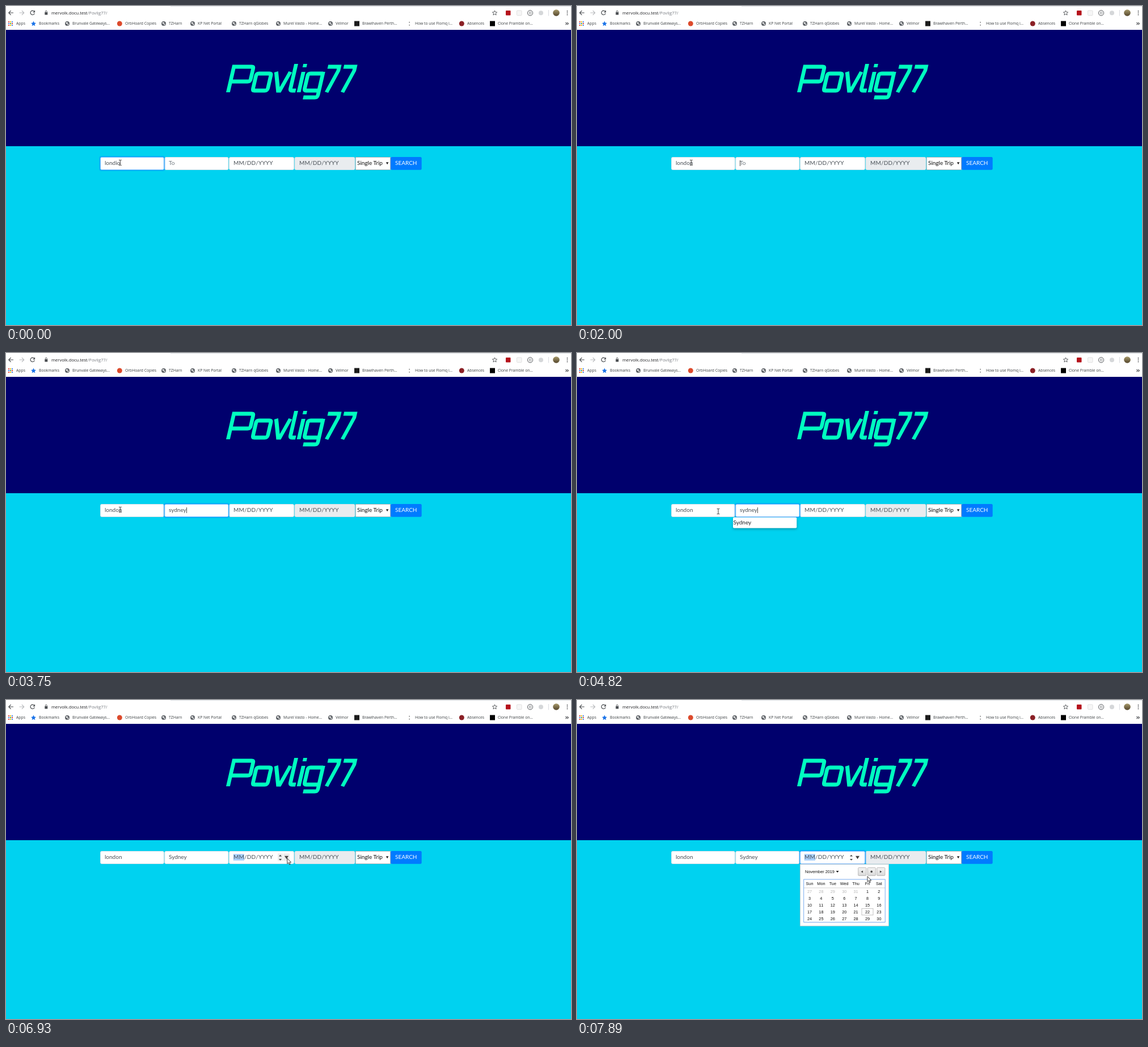
Write an HTML page that moves like this. It is 996 px wide and 562 px high and loops after 8000 ms.

```html
<!DOCTYPE html>
<html lang="en">
<head>
<meta charset="utf-8">
<title>Flight search</title>
<style>
  html, body { margin: 0; width: 100%; height: 100%; overflow: hidden; background: #00d2f0; }
  svg { display: block; width: 100%; height: 100%; }
  text { white-space: pre; }
  .bar { font: 6.8px "Open Sans", "Noto Sans", sans-serif; fill: #3c4043; }
  .url { font-size: 7.6px; fill: #202124; }
  .form { font: 10px Lato, sans-serif; fill: #495057; }
  .date { letter-spacing: .2px; }
  .cal { font: 7.3px "Liberation Sans", Arial, sans-serif; fill: #111; }
  .mid { text-anchor: middle; }
  .line { fill: none; stroke: #4a4d51; stroke-width: 1.2; }
  .box { fill: #fff; stroke: #cfe0e8; stroke-width: 1; }
  .box.on { stroke: #80bdff; }
  .glow { fill: none; stroke: #007bff; stroke-opacity: .36; stroke-width: 2; }
  #list rect { filter: drop-shadow(0 2px 2px rgba(0, 0, 0, .28)); }
</style>
</head>
<body>
<svg viewBox="0 0 996 562" preserveAspectRatio="none">
  <defs>
    <g id="globe">
      <circle r="4" fill="#5f6368"/>
      <path d="M-2.9 -1.2Q-1 -3 0 -2T1.6 -1L-.3 .8ZM.2 1.5L2.8 .3Q3 2 .8 3Z" fill="#fff"/>
    </g>
    <linearGradient id="photo" x2="0" y2="1">
      <stop stop-color="#a79a6c"/><stop offset="1" stop-color="#54462c"/>
    </linearGradient>
    <linearGradient id="key" x2="0" y2="1">
      <stop stop-color="#f4f4f4"/><stop offset="1" stop-color="#d9d9d9"/>
    </linearGradient>
  </defs>

  <!-- browser bars -->
  <rect width="996" height="42" fill="#fff"/>
  <rect x="290" width="706" height="1" fill="#dee1e6"/>
  <path class="line" d="M13 12H5M8.6 8.2L4.8 12L8.6 15.8"/>
  <path class="line" style="stroke:#b9bbbe" d="M23.5 12H31.5M27.9 8.2L31.7 12L27.9 15.8"/>
  <path class="line" d="M49.8 9.6A3.7 3.7 0 1 0 50.3 13M50.5 8V10.8H47.6"/>
  <rect x="68.3" y="11" width="5" height="4.4" rx=".5" fill="#4a4d51"/>
  <path class="line" style="stroke-width:.9" d="M69.4 11V9.8A1.4 1.5 0 0 1 72.2 9.8V11"/>
  <text class="bar url" x="80" y="15">mervolk.docu.test<tspan fill="#777b80">/Povlig77/</tspan></text>
  <path class="line" style="stroke-width:.9" d="M861.5 8L862.7 10.8L865.6 11L863.4 13L864.1 15.9L861.5 14.3L858.9 15.9L859.6 13L857.4 11L860.3 10.8Z"/>
  <rect x="881" y="8" width="8.5" height="8.5" rx="1" fill="#b5121b"/>
  <rect x="900.5" y="8" width="8.5" height="8.5" rx="1" fill="#f6f6f6" stroke="#dadada" stroke-width=".8"/>
  <circle cx="924" cy="12.3" r="4.6" fill="#fff" stroke="#54575b"/>
  <path class="line" style="stroke-width:.8" d="M923 10Q921.8 12.3 923 14.6M925 10Q926.2 12.3 925 14.6"/>
  <circle cx="943" cy="12.3" r="4" fill="#d5d7d9"/>
  <path d="M956.5 7V17.5" stroke="#dadce0"/>
  <circle cx="970" cy="12" r="5.8" fill="url(#photo)"/>
  <g fill="#4a4d51"><circle cx="989.5" cy="9" r=".9"/><circle cx="989.5" cy="12.2" r=".9"/><circle cx="989.5" cy="15.4" r=".9"/></g>
  <g id="marks"></g>

  <!-- banner -->
  <rect y="42" width="996" height="205" fill="#00006d"/>
  <g role="img" aria-label="Povlig77" transform="translate(388 152) skewX(-13)"
     fill="none" stroke="#00ffc0" stroke-width="6.8">
    <path d="M3.4 0V-45H34q4 0 4 4V-23q0 4-4 4H3.4"/>
    <path d="M50 -33H68q4 0 4 4V-7q0 4-4 4H50q-4 0-4-4V-29q0-4 4-4z"/>
    <path d="M80 -36L91 -3H94L105 -36"/>
    <path d="M112 -50V-7q0 4 4 4h6"/>
    <path d="M128 -36V0M128 -50v6"/>
    <path d="M163 -33H141q-4 0-4 4V-7q0 4 4 4H163M163 -36V5q0 4-4 4H138"/>
    <path d="M169 -45H189V-38L177 0M197 -45H217V-38L205 0"/>
  </g>

  <!-- search form -->
  <g id="fields"></g>
  <rect x="616.5" y="266.5" width="61" height="22" fill="#fff" stroke="#b0b6ba"/>
  <text class="form" x="619" y="280.2" style="fill:#111">Single Trip</text>
  <path d="M669.8 275.2H674.4L672.1 279.2Z" fill="#222"/>
  <rect x="678" y="266" width="54.7" height="22.8" rx="2.3" fill="#007bff"/>
  <text class="form" x="686" y="280.2" style="fill:#fff">SEARCH</text>
  <g id="hot" fill="#ececec"><rect x="479" y="270.5" width="9" height="13"/><rect x="489" y="270.5" width="11" height="13"/></g>
  <rect id="pick" x="400.7" y="271.3" width="19.3" height="11.5" fill="#a9d0fb"/>
  <text class="form" id="from" x="174" y="280.2"></text>
  <text class="form" id="to" x="287" y="280.2"></text>
  <text class="form date" x="401" y="280.2">MM/DD/YYYY</text>
  <text class="form date" x="517" y="280.2">MM/DD/YYYY</text>
  <path id="spin" fill="#444" d="M481 275.5H486L483.5 272.8ZM481 280H486L483.5 282.7ZM491 274.7H498L494.5 280.2Z"/>
  <rect id="caret" y="272" width=".8" height="10" fill="#222"/>

  <g id="list">
    <rect x="275" y="289.6" width="112.3" height="18.8" rx="2" fill="#fff"/>
    <text class="form" x="275.6" y="301.8" style="fill:#212529">Sydney</text>
  </g>

  <g id="cal">
    <rect x="393.3" y="289.3" width="156.2" height="108.8" fill="#fff" stroke="#bfc3c6" stroke-width=".8"/>
    <text class="cal" x="402" y="305">November 2019</text>
    <path d="M456.6 301H461.6L459.1 304Z" fill="#111"/>
    <g id="keys"></g>
    <path d="M500.5 302.4L504 300.4V304.4ZM537.4 302.4L533.9 300.4V304.4Z" fill="#444"/>
    <circle cx="519.2" cy="302.4" r="1.8" fill="#444"/>
    <path d="M400 331H543" stroke="#c8c8c8" stroke-width=".8"/>
    <rect x="399.7" y="316" width="143.5" height="75.5" fill="none" stroke="#6aa3ee" stroke-width=".9"/>
    <rect x="502" y="367.3" width="20" height="11.6" fill="#fff" stroke="#b5b5b5" stroke-width=".8"/>
    <g id="days"></g>
  </g>

  <path id="beam" fill="none" stroke="#222" stroke-width=".9" d="M-2.3 -4.6H-.6L0 -4L.6 -4.6H2.3M0 -4V4M-2.3 4.6H-.6L0 4L.6 4.6H2.3"/>
  <path id="arrow" fill="#fff" stroke="#111" stroke-width=".8" d="M0 0V9.5L2.2 7.5L3.8 11L5.3 10.3L3.8 7H6.8Z"/>
</svg>

<script>
const $ = id => document.getElementById(id);

function add(parent, tag, attrs, text = '') {
  const el = document.createElementNS('http://www.w3.org/2000/svg', tag);
  for (const k in attrs) el.setAttribute(k, attrs[k]);
  el.textContent = text;
  parent.append(el);
  return el;
}

// bookmarks: text x, label, icon kind, icon colour
const marks = $('marks');
const bookmarks = [
  [18, 'Apps'], [58, 'Bookmarks'],
  [117, 'Brunvale Gateways...', 'globe'], [210, 'OrbHoard Copies', 'dot', '#dc4a2c'],
  [287, 'TZHarn', 'globe'], [338, 'KP Net Portal', 'globe'], [411, 'TZHarn qGlobes', 'globe'],
  [489, 'Murel Vasto - Home...', 'globe'], [581, 'Velmor', 'globe'],
  [628, 'Brawlhaven Perth...', 'tile', '#1c1c1c'], [721, 'How to use Flomq i...'],
  [813, 'Absences', 'dot', '#8a2026'], [867, 'Clone Pramble on...', 'tile', '#000']
];
for (const [x, label, icon, fill] of bookmarks) {
  add(marks, 'text', { class: 'bar', x, y: 33.4 }, label);
  if (icon === 'globe') add(marks, 'use', { href: '#globe', x: x - 9, y: 31 });
  if (icon === 'dot') add(marks, 'circle', { cx: x - 9.7, cy: 31, r: 4.5, fill });
  if (icon === 'tile') add(marks, 'rect', { x: x - 14, y: 26.5, width: 9, height: 9, fill });
}
const hues = ['#ea4335', '#34a853', '#4285f4', '#fbbc05'];
for (let i = 0; i < 9; i++)
  add(marks, 'rect', { x: 4 + i % 3 * 3, y: 27 + (i / 3 | 0) * 3, width: 2, height: 2, fill: hues[(i * 3 + (i / 3 | 0)) % 4] });
add(marks, 'path', { fill: '#1a73e8', d: 'M48.5 26.6L49.8 29.6L53 29.9L50.6 32L51.3 35.2L48.5 33.5L45.7 35.2L46.4 32L44 29.9L47.2 29.6Z' });
add(marks, 'path', { fill: '#333', d: 'M710.5 28h1.3v1.3h-1.3zM710.5 33h1.3v1.3h-1.3z' });
add(marks, 'path', { class: 'line', d: 'M986.5 28.8L988.5 31L986.5 33.2M989.3 28.8L991.3 31L989.3 33.2' });

// input boxes, then their focus rings on top
const edges = [166, 279.3, 393, 508.5, 616];
const addBox = (i, name, grow, rx) => add($('fields'), 'rect', {
  class: name, x: edges[i] + .5 - grow, y: 266.5 - grow,
  width: edges[i + 1] - edges[i] - 1.5 + 2 * grow, height: 22 + 2 * grow, rx
});
const boxes = [0, 1, 2, 3].map(i => addBox(i, 'box', 0, 2.2));
boxes[3].style.fill = '#e9ecef';
const rings = [0, 1, 2].map(i => addBox(i, 'glow', 1.3, 3));

// calendar
for (let i = 0; i < 3; i++)
  add($('keys'), 'rect', { x: 495.7 + i * 16.5, y: 295.4, width: 14.2, height: 14, rx: 1.2, fill: 'url(#key)', stroke: '#adadad', 'stroke-width': .8 });
const cell = (col, y, text, fill) =>
  add($('days'), 'text', { class: 'cal mid', x: 410 + col * 20.4, y, style: `fill:${fill}` }, text);
['Sun', 'Mon', 'Tue', 'Wed', 'Thu', 'Fri', 'Sat'].forEach((d, i) => cell(i, 326.1, d, '#111'));
for (let i = 0; i < 35; i++)
  cell(i % 7, 339.6 + (i / 7 | 0) * 12, i < 5 ? 27 + i : i - 4, i < 5 ? '#b8b8b8' : '#111');

// what changes, and when
const start = { from: 'londio', to: '', focus: 0, caret: '', beam: [201.3, 276], arrow: null,
                list: 0, cal: 0, spin: 0, hot: 0, pick: 0 };
const steps = [
  [430, { from: 'londi' }],
  [560, { caret: 'from' }],
  [690, { from: 'lond' }],
  [810, { caret: '' }],
  [1500, { from: 'londo' }],
  [1750, { from: 'london' }],
  [2000, { focus: -1, caret: 'to' }],
  [2120, { focus: 1 }],
  [2530, { caret: '' }],
  [3080, { to: 's', caret: 'to' }],
  [3200, { to: 'sy' }],
  [3480, { to: 'syd' }],
  [3620, { to: 'sydn' }],
  [3750, { to: 'sydney' }],
  [4150, { list: 1 }],
  [4300, { caret: '' }],
  [4450, { beam: [205.5, 275] }],
  [4700, { beam: [229, 277] }],
  [4820, { beam: [249, 279], caret: 'to' }],
  [5190, { beam: [270, 281] }],
  [5310, { beam: [282, 284] }],
  [5430, { beam: null, arrow: [287.5, 289.5], caret: '' }],
  [5590, { arrow: [291, 293.5] }],
  [5750, { arrow: [296.5, 299.8], to: 'Sydney', list: 0, caret: 'to' }],
  [5870, { arrow: [330, 297] }],
  [6150, { arrow: [372, 294] }],
  [6270, { arrow: [425, 284], caret: '', spin: 1 }],
  [6390, { arrow: [470, 277] }],
  [6510, { arrow: [493.2, 274.6], hot: 1 }],
  [6660, { arrow: [494, 277] }],
  [6810, { focus: -1, pick: 1 }],
  [6930, { arrow: [495.8, 279] }],
  [7080, { focus: 2, cal: 1 }],
  [7640, { arrow: [499, 287], hot: 0 }],
  [7770, { arrow: [507, 301] }],
  [7890, { arrow: [512, 310.7] }]
];

const show = (id, on) => $(id).style.display = on ? '' : 'none';

function place(id, at) {
  show(id, at);
  if (at) $(id).setAttribute('transform', `translate(${at})`);
}

function draw(t) {
  const s = Object.assign({}, start);
  for (const [at, change] of steps) if (t >= at) Object.assign(s, change);

  $('from').textContent = s.from;
  $('to').textContent = s.to || 'To';
  $('to').style.fill = s.to ? '' : '#6c757d';
  boxes.forEach((b, i) => b.classList.toggle('on', i === s.focus));
  rings.forEach((r, i) => r.style.display = i === s.focus ? '' : 'none');
  for (const id of ['list', 'cal', 'spin', 'hot', 'pick']) show(id, s[id]);
  place('beam', s.beam);
  place('arrow', s.arrow);

  show('caret', s.caret);
  if (s.caret) {
    const el = $(s.caret);
    const width = s[s.caret] ? el.getComputedTextLength() : 0;
    $('caret').setAttribute('x', +el.getAttribute('x') + width + .2);
  }
}

const t0 = performance.now();
function tick() {
  draw((performance.now() - t0) % 8000);
  requestAnimationFrame(tick);
}
tick();
</script>
</body>
</html>
```
